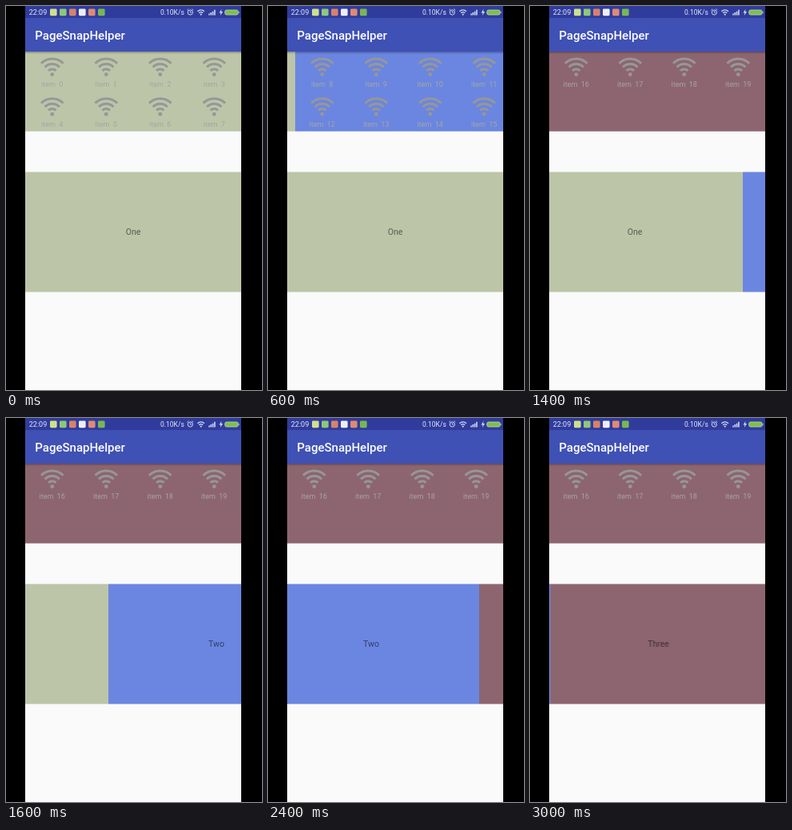
Write an HTML page that moves like this. It is 320 px wide and 480 px high and loops after 3.2 s.

```html
<!DOCTYPE html>
<html lang="en">
<head>
<meta charset="utf-8">
<title>PageSnapHelper</title>
<style>
html, body { margin: 0; width: 100%; height: 100%; overflow: hidden; background: #000; }
svg { display: block; }
text { font-family: Roboto, "Noto Sans", sans-serif; white-space: pre; }
.label { font-size: 9px; fill: #a5a5a2; text-anchor: middle; }
.word { font-size: 10.5px; fill: rgba(0, 0, 0, .54); text-anchor: middle; }
.status { font-size: 9px; fill: #e4e6f4; }
.title { font-size: 15px; font-weight: 500; fill: #fff; }
.olive { fill: #bcc5a8; }
.blue { fill: #6b86e0; }
.plum { fill: #8d6570; }
/* The screen refreshes every 200 ms, so positions are held between steps. */
#grid { animation: grid 3.2s step-end infinite; }
#cards { animation: cards 3.2s step-end infinite; }
@keyframes grid {
  0% { transform: translateX(0); }
  6.25% { transform: translateX(-75px); }
  12.5% { transform: translateX(-206px); }
  18.75% { transform: translateX(-260px); }
  25% { transform: translateX(-270px); }
  31.25% { transform: translateX(-374px); }
  37.5% { transform: translateX(-512px); }
  43.75%, 100% { transform: translateX(-540px); }
}
@keyframes cards {
  0% { transform: translateX(0); }
  43.75% { transform: translateX(-28px); }
  50% { transform: translateX(-166px); }
  56.25% { transform: translateX(-246px); }
  62.5% { transform: translateX(-269px); }
  68.75% { transform: translateX(-270px); }
  75% { transform: translateX(-300px); }
  81.25% { transform: translateX(-435.6px); }
  87.5% { transform: translateX(-515px); }
  93.75%, 100% { transform: translateX(-538.6px); }
}
</style>
</head>
<body>
<svg width="320" height="480" viewBox="0 0 320 480">
  <defs>
    <linearGradient id="shade" x2="0" y2="1">
      <stop stop-color="#000" stop-opacity=".28"/>
      <stop offset="1" stop-color="#000" stop-opacity="0"/>
    </linearGradient>
    <clipPath id="screen"><rect x="24" width="270" height="480"/></clipPath>
    <g id="wifi">
      <path d="M-13.8-13.8A19.5 19.5 0 0 1 13.8-13.8M-9.2-9.2A13 13 0 0 1 9.2-9.2M-4.7-4.7A6.7 6.7 0 0 1 4.7-4.7"
            fill="none" stroke="#979797" stroke-width="3"/>
      <circle r="2.4" fill="#979797"/>
    </g>
  </defs>
  <rect width="320" height="480"/>
  <g clip-path="url(#screen)">
    <rect x="24" width="270" height="480" fill="#fafafa"/>
    <g id="grid"></g>
    <g id="cards"></g>
    <rect x="24" y="57" width="270" height="3" fill="url(#shade)"/>
    <rect x="24" y="15" width="270" height="42" fill="#3f51b5"/>
    <rect x="24" width="270" height="15" fill="#303c9c"/>
    <text class="title" x="36.3" y="42.3">PageSnapHelper</text>
    <text class="status" x="28.8" y="11">22:09</text>
    <text class="status" x="193" y="11" style="font-size:8.5px">0.10K/s</text>
    <g id="badges"></g>
    <g fill="none" stroke="#d5d8ee">
      <circle cx="230.3" cy="8" r="3.1"/>
      <path d="M230.3 6v2.2h1.5M226.4 5.2l1.8-1.6M234.2 5.2l-1.8-1.6" stroke-width=".9"/>
      <path d="M239.4 6.8Q243.7 2.9 248 6.8M241.2 8.7Q243.7 6.6 246.2 8.7" stroke-width="1.3"/>
      <path d="M254 11.5v-2M256.3 11.5v-3.4M258.6 11.5v-4.8M260.9 11.5v-6.7" stroke-width="1.6"/>
    </g>
    <circle cx="243.7" cy="10.6" r="1.1" fill="#d5d8ee"/>
    <path d="M269.6 3.8l-3.1 4.6h2l-.7 3.6 3.3-4.9h-2.1z" fill="#d5d8ee"/>
    <rect x="273.7" y="5" width="16.4" height="6" rx="2" fill="#7fbd4c" stroke="#b9d8b0" stroke-width=".8"/>
    <path d="M291 6.8v2.4" stroke="#b9d8b0"/>
  </g>
</svg>
<script>
const tones = ["olive", "blue", "plum"];
const words = ["One", "Two", "Three"];
const badges = ["#cfe08c", "#8fc878", "#d9826a", "#f0eef2", "#e08a72", "#78b850"];
const byId = id => document.getElementById(id);

const page = (i, y, h) =>
  `<rect class="${tones[i]}" x="${24 + 270 * i}" y="${y}" width="270" height="${h}"/>`;

function item(n) {
  const x = 57.75 + 270 * Math.floor(n / 8) + 67.5 * (n % 4);
  const y = 49.6 * (Math.floor(n / 4) % 2);
  return `<use href="#wifi" x="${x}" y="${85.6 + y}"/>
    <text class="label" x="${x}" y="${101.2 + y}">item  ${n}</text>`;
}

byId("grid").innerHTML = tones.map((_, i) => page(i, 57, 99.7)).join("") +
  Array.from({ length: 20 }, (_, n) => item(n)).join("");

byId("cards").innerHTML = words.map((word, i) => page(i, 207.5, 150) +
  `<text class="word" x="${159 + 270 * i}" y="286.4">${word}</text>`).join("");

byId("badges").innerHTML = badges.map((color, i) =>
  `<rect x="${55 + 12 * i}" y="3.6" width="8.6" height="8.6" rx="1.4" fill="${color}"/>`).join("");
</script>
</body>
</html>
```
